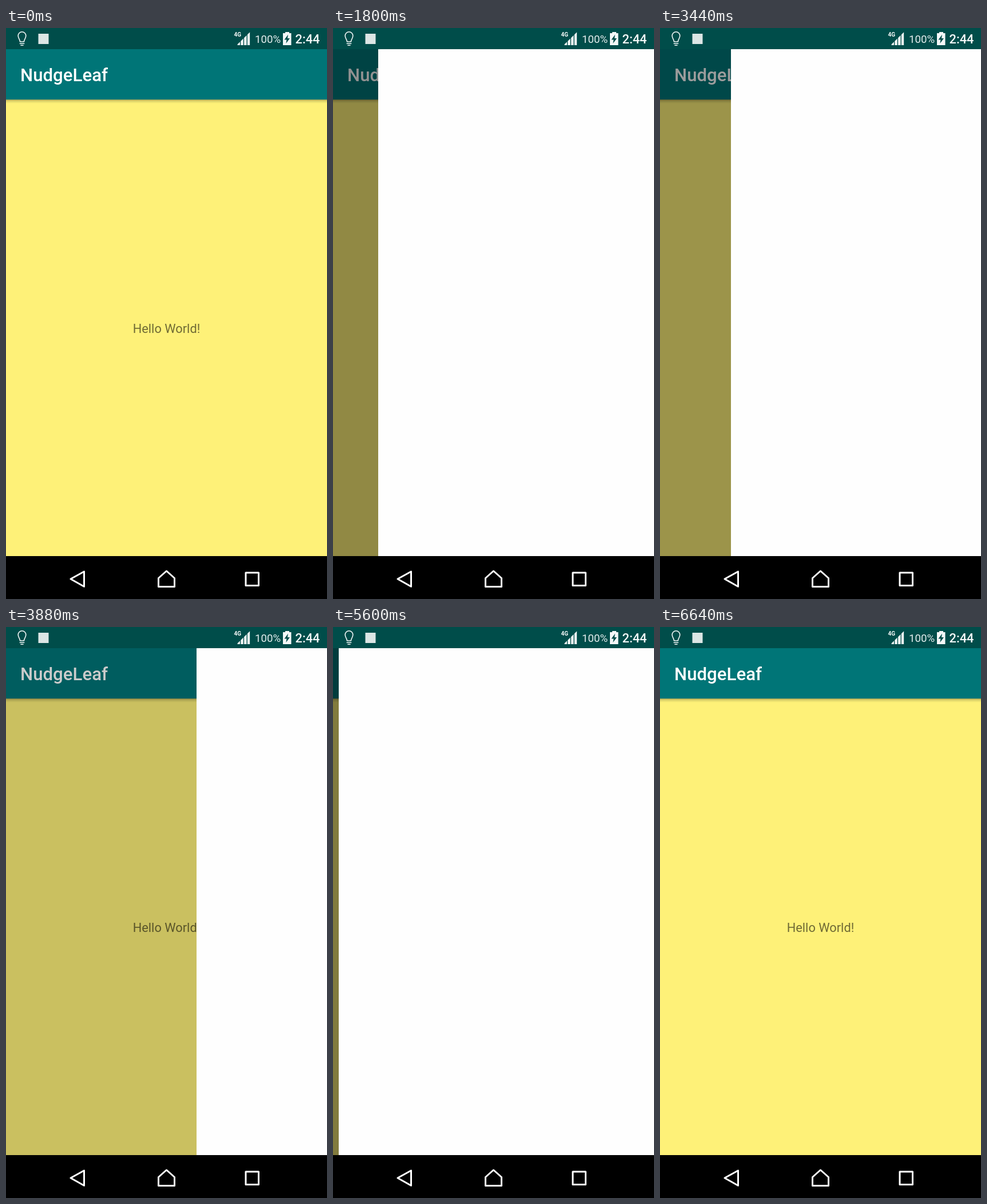
Write an HTML page with a canvas that moves like this. It is 561x998 px and loops after 7.16 s.

```html
<!DOCTYPE html>
<html lang="en">
<head>
<meta charset="utf-8">
<title>Swipe to go back</title>
<style>
  html, body { margin: 0; width: 100%; height: 100%; overflow: hidden; background: #000; }
  canvas { display: block; width: 561px; height: 998px; }
</style>
</head>
<body>
<canvas id="stage" width="561" height="998"></canvas>
<script>
const ctx = document.getElementById('stage').getContext('2d');
const W = 561, H = 998, TOP = 37, BAR = 125, BOTTOM = 923;
const LOOP = 7160, STEP = 40;
const STATUS = '#004d4a', INK = '#f4f8f8';

const linear = p => p;
const settle = p => 1 - Math.pow(1 - p, 5);

// Left edge of the white page: [time, x, easing towards this point]
const drag = [
  [1480, 0], [1520, 6], [1640, 30], [1800, 79], [2000, 160], [2200, 235],
  [2320, 235], [2690, 0, settle],
  [3120, 0], [3160, 8], [3400, 105], [3880, 333], [4120, 425], [4270, 465],
  [4560, W, settle],
  [4999, W], [5000, 0],
  [5560, 0], [5600, 10], [5720, 88], [5900, 330], [6200, W, settle]
];
// The page fades in over its last moments before each of these times
const opens = [1200, 5080];
const FADE = 80;

function edgeAt(t) {
  if (t <= drag[0][0]) return 0;
  for (let i = 1; i < drag.length; i++) {
    const [t0, x0] = drag[i - 1];
    const [t1, x1, ease = linear] = drag[i];
    if (t <= t1) return x0 + (x1 - x0) * ease((t - t0) / (t1 - t0));
  }
  return W;
}

function opacityAt(t) {
  if (t < opens[0]) return Math.max(0, 1 - (opens[0] - t) / FADE);
  if (t > opens[1] - FADE && t < opens[1]) return 1 - (opens[1] - t) / FADE;
  return t === opens[1] - FADE ? 0 : 1;
}

function rect(x, y, w, h, color) {
  ctx.fillStyle = color;
  ctx.fillRect(x, y, w, h);
}

function text(str, x, y, font, color, align = 'left') {
  ctx.font = font + ' Roboto, sans-serif';
  ctx.textAlign = align;
  ctx.fillStyle = color;
  ctx.fillText(str, x, y);
}

function path(points, close = true) {
  ctx.beginPath();
  points.forEach(([x, y]) => ctx.lineTo(x, y));
  if (close) ctx.closePath();
}

function drawBulb() {
  ctx.strokeStyle = INK;
  ctx.lineWidth = 1.6;
  ctx.lineJoin = ctx.lineCap = 'round';
  ctx.beginPath();
  ctx.moveTo(24.5, 24);
  ctx.bezierCurveTo(24.5, 19.5, 21.2, 18.5, 21.2, 13.6);
  ctx.arc(28, 13.6, 6.8, Math.PI, 0);
  ctx.bezierCurveTo(34.8, 18.5, 31.5, 19.5, 31.5, 24);
  ctx.closePath();
  ctx.moveTo(24.3, 27.3);
  ctx.lineTo(31.7, 27.3);
  ctx.moveTo(26, 30.2);
  ctx.lineTo(30, 30.2);
  ctx.stroke();
}

function drawSignal() {
  ctx.save();
  path([[403, 30], [426.5, 30], [426.5, 7]]);
  ctx.clip();
  for (let i = 0; i < 4; i++) rect(404.5 + i * 5.8, 7, 4.4, 23, INK);
  ctx.restore();
}

function drawBattery() {
  rect(488, 7, 7, 3, INK);
  rect(484, 9, 14.5, 21, INK);
  path([[493, 11.5], [486.5, 20.5], [490.4, 20.5], [489.4, 27], [496, 18], [492, 18]]);
  ctx.fillStyle = STATUS;
  ctx.fill();
}

function drawStatus() {
  rect(0, 0, W, TOP, STATUS);
  drawBulb();
  rect(56.5, 10, 18, 18, '#dce6e5');
  text('4G', 398.5, 15, '700 10px', INK);
  drawSignal();
  text('100%', 435, 26, '400 18.7px', '#e4eded');
  drawBattery();
  text('2:44', 505.5, 27, '500 21.8px', INK);
}

function drawHome() {
  rect(0, TOP, W, BOTTOM - TOP, '#fef178');
  const shade = ctx.createLinearGradient(0, BAR, 0, BAR + 7);
  shade.addColorStop(0, 'rgba(0,0,0,.32)');
  shade.addColorStop(0.4, 'rgba(0,0,0,.12)');
  shade.addColorStop(1, 'rgba(0,0,0,0)');
  rect(0, BAR, W, 7, shade);
  rect(0, TOP, W, BAR - TOP, '#007577');
  text('NudgeLeaf', 25, 93, '500 31.2px', '#fff');
  text('Hello World!', W / 2, 533, '400 21.8px', 'rgba(0,0,0,.56)', 'center');
}

function drawPage(t) {
  const opacity = opacityAt(t);
  const x = edgeAt(t);
  if (opacity <= 0 || x >= W) return;
  if (opacity === 1) {
    rect(0, TOP, x, BOTTOM - TOP, `rgba(0,0,0,${0.5 * (1 - x / W)})`);
  }
  ctx.globalAlpha = opacity;
  rect(Math.round(x), TOP, W, BOTTOM - TOP, '#fefefe');
  ctx.globalAlpha = 1;
}

function drawNav() {
  rect(0, BOTTOM, W, H - BOTTOM, '#000');
  ctx.strokeStyle = '#fff';
  ctx.lineWidth = 3;
  ctx.lineJoin = 'round';
  path([[113, 963], [136.5, 950], [136.5, 976.3]]);
  ctx.stroke();
  path([[266.5, 976.5], [266.5, 961.5], [280.5, 949], [294.5, 961.5], [294.5, 976.5]]);
  ctx.stroke();
  ctx.strokeRect(419, 952, 22.5, 22.5);
}

function frame(now) {
  const t = Math.floor((now % LOOP) / STEP) * STEP;
  drawHome();
  drawPage(t);
  drawStatus();
  drawNav();
  requestAnimationFrame(frame);
}

frame(performance.now());
</script>
</body>
</html>
```
